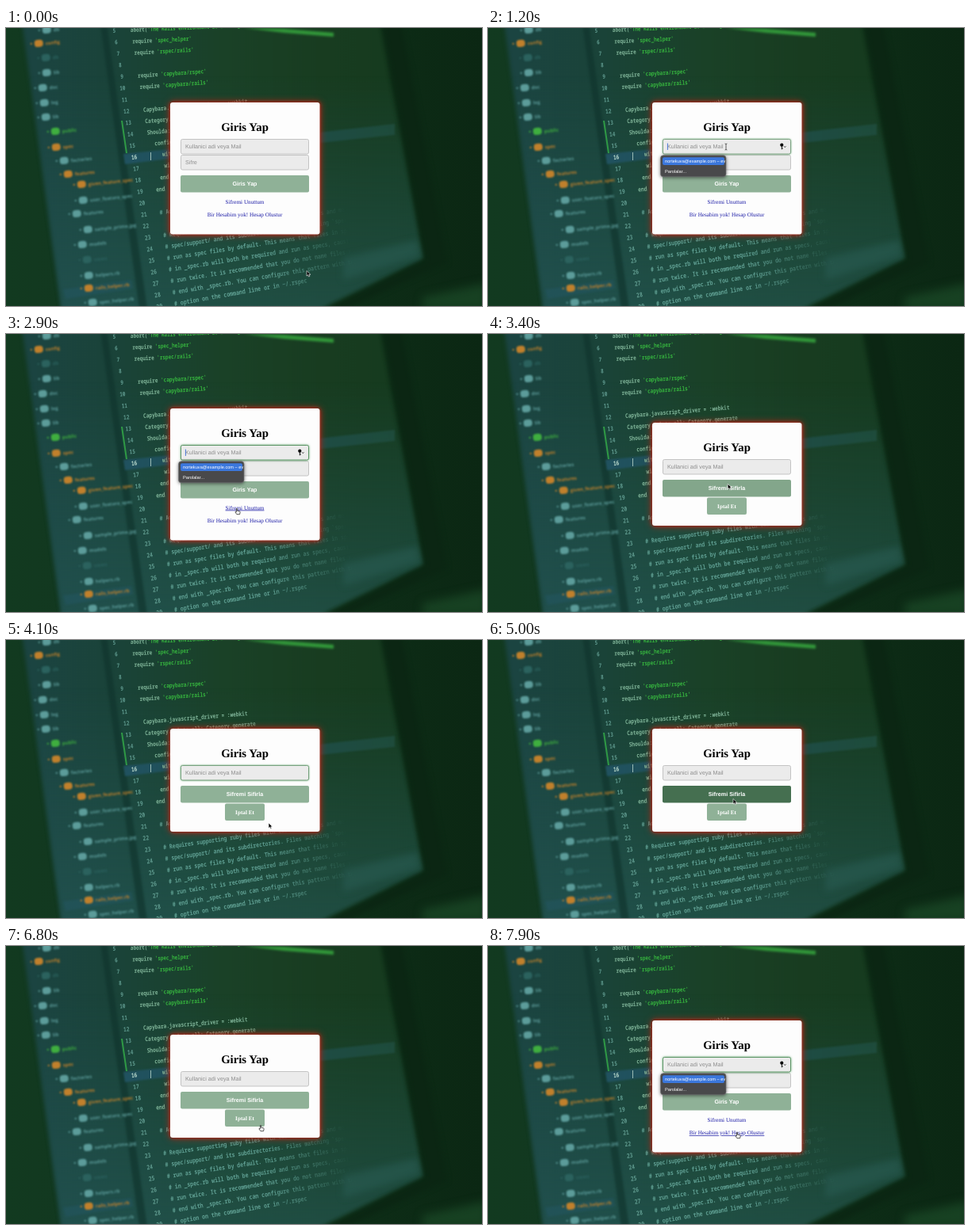
Write an HTML page with a canvas that moves like this. It is 600x351 px and loops after 8000 ms.

```html
<!DOCTYPE html>
<html lang="tr">
<head>
<meta charset="utf-8">
<title>Giris Yap</title>
<style>
html, body { margin: 0; width: 100%; height: 100%; overflow: hidden; background: #0d2c18; }
canvas, svg { position: absolute; left: 0; top: 0; width: 600px; height: 351px; }
text { font: 7.2px "Liberation Sans", Arial, sans-serif; text-rendering: geometricPrecision; }
.mid { text-anchor: middle; }
.serif, .title, .link { font-family: "Liberation Serif", Times, serif; }
.title { font-size: 14.75px; font-weight: bold; }
.link { fill: #1a1aa6; }
.label { fill: #fff; font-weight: bold; }
.hint { fill: #8d8d8d; }
.card { fill: #fdfdfd; filter: drop-shadow(0 0 2px #b3261a) drop-shadow(0 0 4px #a8281a); }
.field { fill: #ebebeb; stroke: #c3c3c3; }
.menu text { font-size: 5.65px; fill: #fff; }
</style>
</head>
<body>
<canvas id="photo" width="600" height="351"></canvas>
<svg viewBox="0 0 600 351">
  <g id="login">
    <rect class="card" x="207" y="94" width="188.5" height="166.5" rx="3"/>
    <text class="title mid" x="301" y="129.5">Giris Yap</text>
    <rect class="field" x="220.5" y="160.5" width="161" height="18.5" rx="2"/>
    <text class="hint" x="226" y="172.3">Sifre</text>
    <rect id="mail" class="field" x="220.5" y="140.5" width="161" height="18.5" rx="2"/>
    <text class="hint" x="226" y="152.3">Kullanici adi veya Mail</text>
    <rect id="enter" x="220" y="186" width="162" height="21.5" rx="2"/>
    <text class="label mid" x="301" y="199.4">Giris Yap</text>
    <text id="forgot" class="link mid" x="301" y="221.5">Sifremi Unuttum</text>
    <text id="join" class="link mid" x="301" y="238">Bir Hesabim yok! Hesap Olustur</text>
    <g id="focused">
      <path id="caret" d="M226.4 145.5v8.5" stroke="#3b6fd8" stroke-width=".9"/>
      <circle cx="370.3" cy="147.7" r="2.1"/>
      <path d="M370.3 149v4.3M370.3 152h1.5M373.2 149.4l1.1 1.1 1.1-1.1" fill="none" stroke="#000" stroke-width=".9"/>
      <g class="menu">
        <rect x="217.5" y="160.8" width="82.5" height="27" rx="3.5" fill="#49494b" stroke="#77787a" stroke-width=".6" style="filter:drop-shadow(0 1px 2px #0008)"/>
        <rect x="220" y="163.3" width="78" height="9.7" rx="2" fill="#3b77dc"/>
        <text x="223" y="170.2">nortekuva@example.com – ev</text>
        <text x="223" y="182.7">Parolalar...</text>
      </g>
    </g>
  </g>
  <g id="reset">
    <rect class="card" x="207" y="112" width="188.5" height="130" rx="3"/>
    <text class="title mid" x="301" y="147.5">Giris Yap</text>
    <rect id="resetMail" class="field" x="220.5" y="158.5" width="161" height="18.5" rx="2"/>
    <text class="hint" x="226" y="170.3">Kullanici adi veya Mail</text>
    <rect id="send" x="220" y="184" width="162" height="21.5" rx="2"/>
    <text class="label mid" x="301" y="197.4">Sifremi Sifirla</text>
    <rect x="276" y="206.5" width="50" height="21.5" rx="2" fill="#8fb197"/>
    <text class="label serif mid" x="301" y="219.6">Iptal Et</text>
  </g>
  <g id="pointer" stroke-linejoin="round">
    <path id="arrow" d="M0 0v6.6l1.6-1.4 1 2.3 1.2-.5-1-2.2h2.1z" fill="#000" stroke="#fff" stroke-width=".6"/>
    <path id="hand" d="M-.6 .6q.6-1 1.2 0v2.6l3 .7q.7.3.5 1.2l-.5 2.6h-3.7l-2-2.8q.1-1 1.5-.1z" fill="#fff" stroke="#111" stroke-width=".7"/>
    <path id="beam" d="M-1.4-4q1.4 0 1.4 1v6q0 1-1.4 1M1.4-4q-1.4 0-1.4 1M1.4 4q-1.4 0-1.4-1" fill="none" stroke="#222" stroke-width=".7"/>
  </g>
</svg>
<script>
const $ = id => document.getElementById(id);
const LOOP = 8000;

// ---- blurred monitor behind the form ----
const g = $('photo').getContext('2d');

function ramp(x0, y0, x1, y1, ...colors) {
  const r = g.createLinearGradient(x0, y0, x1, y1);
  colors.forEach((c, i) => r.addColorStop(i / (colors.length - 1), c));
  return r;
}

function shape(fill, blur, ...pts) {
  g.filter = `blur(${blur}px)`;
  g.fillStyle = fill;
  g.beginPath();
  pts.forEach(([x, y]) => g.lineTo(x, y));
  g.fill();
  g.filter = 'none';
}

function slanted(x, y, deg, draw) {
  g.save();
  g.translate(x, y);
  g.rotate(deg * Math.PI / 180);
  draw();
  g.restore();
}

const code = [
  'abort("The Rails environment is running in production mode!")',
  "require 'spec_helper'",
  "require 'rspec/rails'",
  '',
  "require 'capybara/rspec'",
  "require 'capybara/rails'",
  '',
  'Capybara.javascript_driver = :webkit',
  'Category.delete_all; Category.generate',
  'Shoulda::Matchers.configure do |config|',
  '  config.integrate do |with|',
  '    with.test_framework :rspec',
  '    with.library :rails',
  '  end',
  'end',
  '',
  '# Add additional requires below this line.',
  '',
  '# Requires supporting ruby files with custom matchers and macros,',
  '# spec/support/ and its subdirectories. Files matching `spec/**/*',
  '# run as spec files by default. This means that files in spec/support',
  '# in _spec.rb will both be required and run as specs, causing the',
  '# run twice. It is recommended that you do not name files matching',
  '# end with _spec.rb. You can configure this pattern with the',
  '# option on the command line or in ~/.rspec',
];

const ORANGE = '#c0802c', TEAL = '#5c9c9a', GREEN = '#3fae3f', DIM = '#2b625e';
const tree = [
  [41, 5, 'db', TEAL], [31, 22, 'config', ORANGE], [40, 40, 'db', DIM],
  [41, 59, 'lib', TEAL], [36, 78, 'doc', TEAL], [38, 97, 'log', TEAL],
  [40, 115, 'lib', TEAL], [52, 133, 'public', GREEN], [53, 153, 'spec', ORANGE],
  [63, 170, 'factories', TEAL], [68, 187, 'features', ORANGE],
  [85, 200, 'given_feature_spec', ORANGE], [87, 220, 'user_feature_spec', TEAL],
  [79, 237, 'features', TEAL], [93, 257, 'sample_prime.jpg', TEAL],
  [86, 276, 'models', TEAL], [92, 295, 'views', DIM], [94, 315, 'helpers.rb', TEAL],
  [94, 331, 'rails_helper.rb', ORANGE], [99, 349, 'spec_helper.rb', TEAL],
];

function paintTree() {
  g.filter = 'blur(.9px)';
  g.font = 'bold 6px "Open Sans", sans-serif';
  for (const [x, y, label, color] of tree) slanted(x, y, -6, () => {
    g.fillStyle = color;
    g.fillRect(0, -3, 2, 2);
    g.beginPath();
    g.roundRect(5, -6, 11, 9, 4);
    g.fill();
    g.fillText(label, 19, 1.5);
  });
  g.filter = 'none';
}

function paintCode() {
  const fading = color => ramp(0, 0, 290, 0, color, color, color + '00');
  code.forEach((line, i) => slanted(157 + 2.3 * i, 3 + 14.42 * i, -2.4 - .32 * i, () => {
    g.scale(.8, 1); // the monitor is seen from the side
    g.filter = 'blur(.3px)';
    g.font = `bold ${7.4 + .035 * i}px "Noto Sans Mono", "DejaVu Sans Mono", monospace`;
    g.fillStyle = i == 11 ? '#b5d5c8' : '#5f9a8e';
    g.textAlign = 'right';
    g.fillText(i + 5, .2 * i - 23.5, 2);
    g.textAlign = 'left';
    let left = 0;
    for (const part of line.split(/('[^']*'|"[^"]*")/)) {
      g.fillStyle = fading(line[0] == '#' ? '#5f9f92' : /^['"]/.test(part) ? '#35b33e' : '#7fb498');
      g.fillText(part, left, 2);
      left += g.measureText(part).width;
    }
  }));
}

function paintPhoto() {
  g.fillStyle = ramp(0, 0, 600, 0, '#123a20', '#12351f', '#0e2f18', '#0b2713');
  g.fillRect(0, 0, 600, 351);
  const screen = [[20, -8], [471, -8], [526, 291], [404, 351], [385, 362], [71, 362]];
  shape(ramp(20, 0, 526, 0, '#1b4442', '#1a4338', '#1a4127', '#183c20', '#153a1e'), 2.5, ...screen);
  shape(ramp(0, 60, 0, 351, '#24575600', '#245756a0'), 2.5, ...screen);
  shape('#11352eb0', 1.5, [119, -5], [127, -5], [178, 355], [168, 355]);
  shape(ramp(148, 0, 490, 0, '#215260', '#215260a0', '#24564c90'), 1,
    [148, 159], [207, 153], [490, 121], [490, 135], [207, 165], [150, 172]);
  shape('#24566099', 1.5, [72, 330], [158, 318], [160, 329], [75, 342]);
  shape('#2d605880', 4, [425, 290], [518, 268], [522, 288], [425, 318]);
  shape('#0b2613', 3, [475, -8], [498, -8], [556, 296], [420, 358], [408, 355], [530, 293]);
  shape('#1f502ca0', 6, [525, 340], [606, 322], [606, 356], [525, 356]);
  shape('#32983a', 1.5, [300, 0], [350, 1], [413, 6], [413, 11], [350, 6]);

  paintTree();
  paintCode();
  g.fillStyle = '#b9d8cc';
  g.fillRect(182, 157, .8, 10);
  shape('#2f9a45', .4, [145, 117], [147, 117], [153, 158], [151, 158]);
}

// ---- pointer path and form states ----
const path = [
  [300, 379, 306.5], [1000, 300, 150], [1400, 300, 150], [2000, 293, 195],
  [2300, 293, 195], [2750, 291, 220], [3300, 291, 220], [3480, 310, 168],
  [3580, 310, 168], [3880, 331, 231], [4450, 331, 231], [4750, 309, 200.5],
  [5500, 309, 200.5], [6200, 321, 226], [7000, 321, 226], [7250, 300, 150],
  [7400, 300, 150], [7850, 314, 235], [8000, 314, 235],
];

function pointerAt(t) {
  const i = path.findIndex(k => k[0] > t);
  if (i <= 0) return path[i ? path.length - 1 : 0].slice(1);
  const [t0, x0, y0] = path[i - 1], [t1, x1, y1] = path[i];
  const u = (t - t0) / (t1 - t0), e = u * u * (3 - 2 * u);
  return [x0 + (x1 - x0) * e, y0 + (y1 - y0) * e];
}

const zones = {
  login: { enter: [220, 186, 382, 207.5], mail: [220, 140, 382, 179.5],
           forgot: [276, 214, 326, 224], join: [253, 231, 349, 241] },
  reset: { send: [220, 184, 382, 205.5], resetMail: [220, 158, 382, 177.5],
           cancel: [276, 206.5, 326, 228] },
};
const between = (t, a, b) => t >= a && t < b;
const pageAt = t => between(t, 3300, 7000) ? 'reset' : 'login';

function hoverAt(t) {
  const [x, y] = pointerAt(t), page = zones[pageAt(t)];
  return Object.keys(page).find(k => {
    const [l, top, r, b] = page[k];
    return between(x, l, r) && between(y, top, b);
  });
}

const mailFocus = t => between(t, 1050, 3300) || t >= 7320;
const resetFocus = t => between(t, 3530, 4050);

// Mean of a yes/no state over the last 240 ms: a linear transition
function eased(test, t) {
  let sum = 0;
  for (let k = 0; k < 12; k++) sum += test(t - 20 * k);
  return sum / 12;
}

const mix = (a, b, u) => `rgb(${a.map((v, i) => v + (b[i] - v) * u)})`;
const show = (id, on) => $(id).style.display = on ? '' : 'none';

function paintField(id, u) {
  const s = $(id).style;
  s.stroke = mix([195, 195, 195], [91, 148, 101], u);
  s.filter = u ? `drop-shadow(0 0 ${1.5 * u}px #6fae7a)` : 'none';
}

function frame(now) {
  const t = now % LOOP, page = pageAt(t), over = hoverAt(t);
  show('login', page == 'login');
  show('reset', page == 'reset');
  show('focused', mailFocus(t));
  show('caret', t % 1000 < 500 || between(t, 2000, 3000));
  paintField('mail', eased(mailFocus, t));
  paintField('resetMail', eased(resetFocus, t));
  for (const id of ['enter', 'send'])
    $(id).style.fill = mix([143, 177, 151], [69, 111, 80], eased(s => hoverAt(s) == id, t));
  for (const id of ['forgot', 'join'])
    $(id).style.textDecoration = over == id ? 'underline' : 'none';

  const hand = ['forgot', 'join', 'cancel'].includes(over);
  const beam = ['mail', 'resetMail'].includes(over);
  show('hand', hand);
  show('beam', beam);
  show('arrow', !hand && !beam);
  $('pointer').setAttribute('transform', `translate(${pointerAt(t)})`);
  requestAnimationFrame(frame);
}

paintPhoto();
requestAnimationFrame(frame);
</script>
</body>
</html>
```
